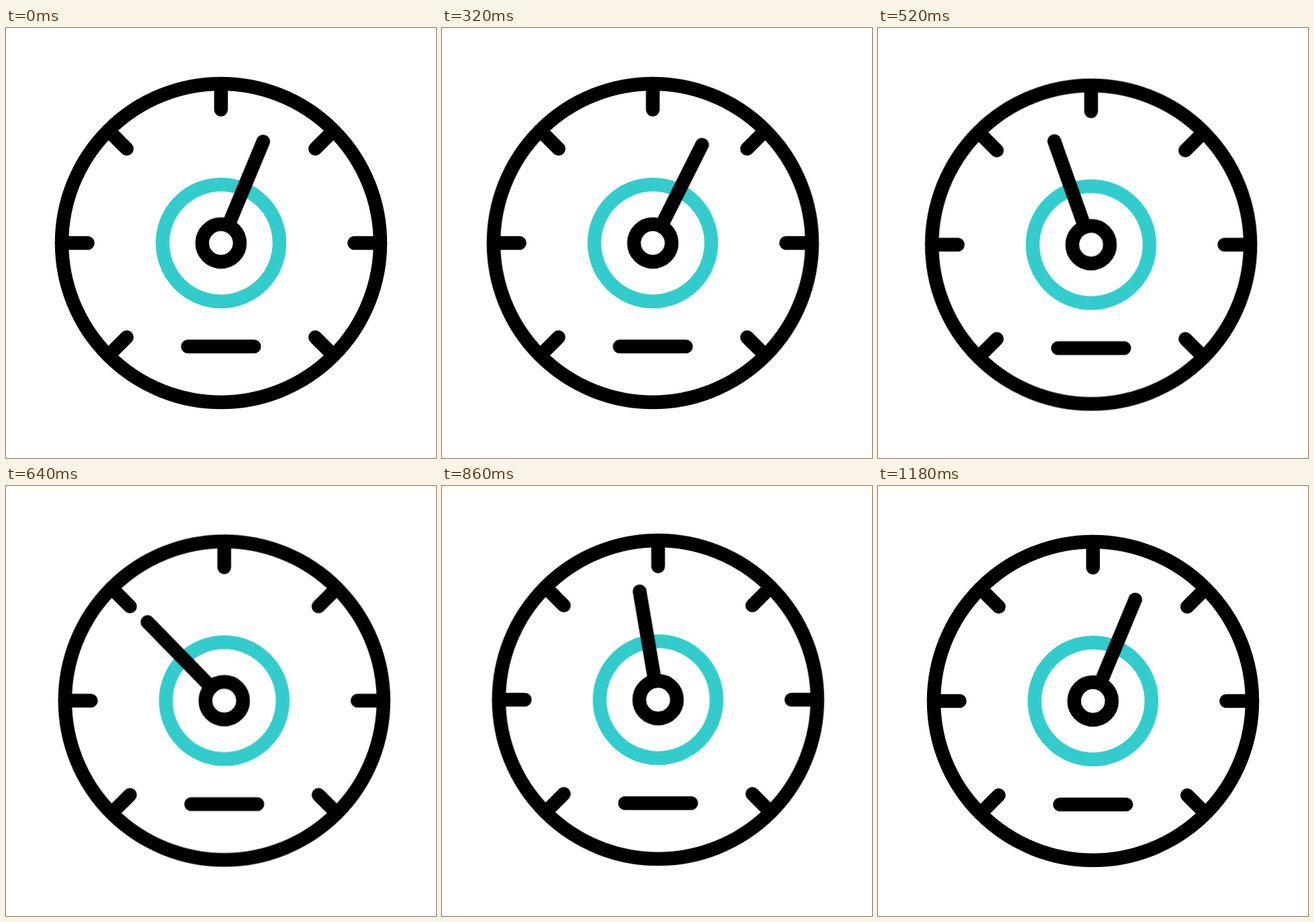
Recreate the animation shown at these times as an HTML page. Size 640 by 640 pixels, loop 1200 ms.

```html
<!DOCTYPE html>
<html lang="en">
<head>
<meta charset="utf-8">
<title>Gauge</title>
<style>
  html, body { margin: 0; width: 100%; height: 100%; overflow: hidden; background: #fff; }
  svg { display: block; width: 100%; height: 100%; }
  .dial { fill: none; stroke: #000; stroke-width: 20.5; stroke-linecap: round; }
  .ring { stroke: #3cc; }
  .dial { animation: shake 1200ms linear infinite; }
  .needle { animation: swing 1200ms cubic-bezier(.333, 0, .667, 1) infinite; }

  /* The dial rattles around a small flat loop, then settles. */
  @keyframes shake {
    0%, 98.333%, 100% { transform: translate(320px, 320px); }
    10.417%, 45.25%, 63.333%, 90% { transform: translate(313.5px, 320px); }
    13.333% { transform: translate(317.5px, 317.5px); }
    15%, 31.333%, 49.75%, 70% { transform: translate(320px, 317.3px); }
    18.917%, 36%, 54.333%, 76.667% { transform: translate(326px, 320px); }
    22.75%, 40.583%, 58.833% { transform: translate(320px, 323.2px); }
    26.667% { transform: translate(313.6px, 320px); }
    43.333% { transform: translate(317.3px, 322.6px); }
    61.667% { transform: translate(316px, 321.3px); }
    83.333% { transform: translate(320.8px, 322px); }
  }

  @keyframes swing {
    0%, 85%, 100% { transform: rotate(22.6deg); }
    10% { transform: rotate(15.6deg); }
    23.333% { transform: rotate(28.8deg); }
    57.167% { transform: rotate(-46.9deg); }
  }
</style>
</head>
<body>
<svg viewBox="0 0 640 640">
  <defs><path id="tick" d="M0-237V-198.4"/></defs>
  <g class="dial">
    <circle r="237"/>
    <use href="#tick"/>
    <use href="#tick" transform="rotate(45)"/>
    <use href="#tick" transform="rotate(90)"/>
    <use href="#tick" transform="rotate(135)"/>
    <use href="#tick" transform="rotate(225)"/>
    <use href="#tick" transform="rotate(270)"/>
    <use href="#tick" transform="rotate(315)"/>
    <path d="M-49.3 154H49.3"/>
    <circle class="ring" r="87"/>
    <circle r="28"/>
    <path class="needle" d="M0-28V-163.6"/>
  </g>
</svg>
</body>
</html>
```
